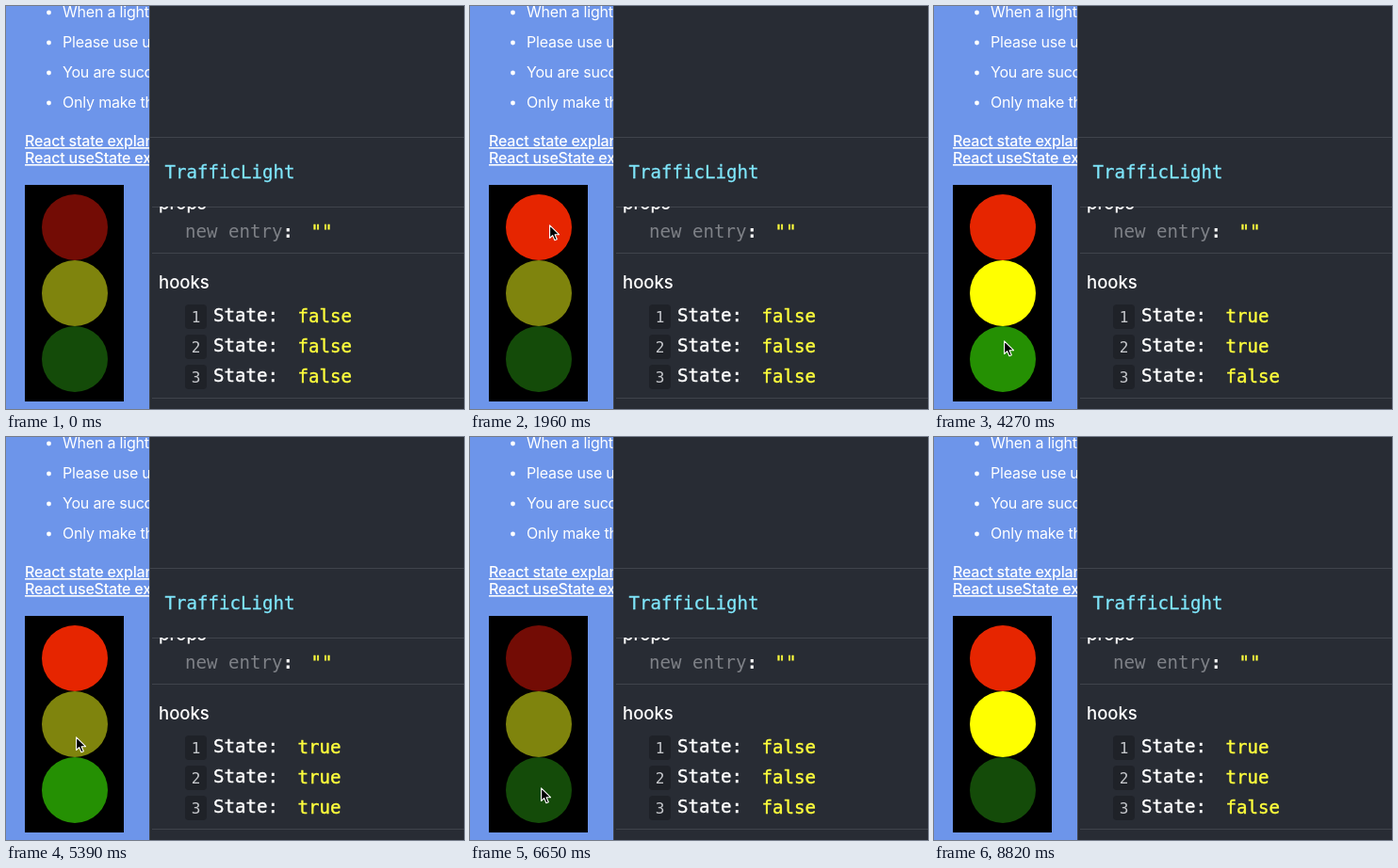
Write an HTML page that moves like this. It is 486 px wide and 428 px high and loops after 8.89 s.

```html
<!DOCTYPE html>
<html lang="en">
<head>
<meta charset="utf-8">
<title>Traffic light state</title>
<style>
html, body { margin: 0; width: 100%; height: 100%; overflow: hidden; background: #282c34; }
svg { display: block; }
.sans { font-family: Inter, "Open Sans", sans-serif; }
.mono { font-family: "DejaVu Sans Mono", monospace; font-size: 19.1px; }
.page { font-size: 16px; fill: #fff; letter-spacing: -.2px; }
.link { text-decoration: underline; font-weight: 500; }
.head { font-size: 18.5px; font-weight: 500; fill: #fff; }
.name { fill: #7fe6fb; stroke: #7fe6fb; stroke-width: .3px; }
.label { fill: #fff; stroke: #fff; stroke-width: .4px; }
.value { fill: #ffff3c; stroke: #ffff3c; stroke-width: .4px; }
.badge { font-size: 16px; fill: #c6c8cc; text-anchor: middle; }
</style>
</head>
<body>
<svg width="486" height="428" viewBox="0 0 486 428">
  <defs>
    <clipPath id="left"><rect width="152" height="428"/></clipPath>
    <clipPath id="scroll"><rect x="152" y="213" width="334" height="215"/></clipPath>
  </defs>
  <g clip-path="url(#left)" class="sans page">
    <rect width="152" height="428" fill="#6d95ea"/>
    <g id="list"></g>
    <text class="link" x="20" y="149">React state explanation</text>
    <text class="link" x="20" y="167">React useState explanation</text>
    <rect x="20" y="190" width="105" height="230" fill="#000"/>
    <g id="lamps"></g>
  </g>
  <rect x="152" width="334" height="428" fill="#282c34"/>
  <rect x="152" width="1" height="428" fill="#40444c"/>
  <path d="M153 139.5H486M155 213.5H486M155 262.5H486M155 416.5H486" stroke="#40444c"/>
  <text class="mono name" x="168.500" y="183">TrafficLight</text>
  <text class="sans head" x="162" y="216" clip-path="url(#scroll)">props</text>
  <text class="mono" x="190" y="246" fill="#7e8187">new entry<tspan fill="#fff" font-weight="bold">:</tspan></text>
  <text class="mono value" x="323.500" y="246">""</text>
  <text class="sans head" x="162" y="300">hooks</text>
  <g id="hooks"></g>
  <g id="cursor">
    <path d="M.6 .8V14.500L3.700 11.600L5.900 16.800L8.300 15.700L6.100 10.700H10.500Z"
      fill="#000" stroke="#fff" stroke-width="1.100" stroke-linejoin="round"/>
  </g>
</svg>
<script>
const LOOP = 8890, STEP = 70;
const $ = id => document.getElementById(id);

function add(parent, tag, attrs, text = '') {
  const el = document.createElementNS('http://www.w3.org/2000/svg', tag);
  for (const key in attrs) el.setAttribute(key, attrs[key]);
  el.textContent = text;
  return parent.appendChild(el);
}

['When a light is on', 'Please use useState', 'You are successful', 'Only make the light']
  .forEach((line, i) => {
    const y = 12 + i * 32;
    add($('list'), 'circle', { cx: 45.5, cy: y - 5, r: 2.4, fill: '#fff' });
    add($('list'), 'text', { x: 60, y }, line);
  });

// Times at which each lamp toggles, and when the inspector picks that up.
const lights = [
  { off: '#730c05', on: '#e62500', clicks: [1610, 5810, 7280], polls: [2380, 6580, 7560] },
  { off: '#7f840d', on: '#ffff00', clicks: [2800, 5390, 7840], polls: [3430, 5530, 8750] },
  { off: '#144b09', on: '#259003', clicks: [4200, 6440], polls: [4550, 6580] }
];

lights.forEach((light, i) => {
  const y = 335 + i * 32;
  light.lamp = add($('lamps'), 'circle', { cx: 73, cy: 235 + i * 70, r: 35 });
  add($('hooks'), 'rect', { x: 190, y: y - 18, width: 23, height: 26, rx: 4, fill: '#1f2228' });
  add($('hooks'), 'text', { class: 'mono badge', x: 201.5, y: y + 1 }, i + 1);
  add($('hooks'), 'text', { class: 'mono label', x: 220, y }, 'State:');
  light.value = add($('hooks'), 'text', { class: 'mono value', x: 309.5, y: y + 1 });
});

// Cursor stops: time, x, y
const path = [
  [280, 70, 436], [1050, 88, 225], [1470, 88, 225], [1960, 84, 232],
  [2310, 84, 232], [2800, 78, 293], [3640, 78, 293], [4200, 74, 355],
  [4480, 74, 355], [5040, 74, 318], [5460, 74, 318], [5810, 78, 236],
  [6090, 78, 236], [6440, 75, 372], [6930, 75, 372], [7280, 78, 238],
  [7560, 78, 238], [7840, 76, 300], [8050, 76, 300], [8330, 70, 436]
];

const ease = p => p * p * (3 - 2 * p);

function cursorAt(t) {
  const next = path.findIndex(stop => stop[0] > t);
  if (next < 1) return path[0].slice(1);
  const [t0, x0, y0] = path[next - 1], [t1, x1, y1] = path[next];
  const p = ease((t - t0) / (t1 - t0));
  return [x0 + (x1 - x0) * p, y0 + (y1 - y0) * p];
}

const isOn = (times, t) => times.filter(time => time <= t).length % 2 === 1;

function draw(now) {
  const t = Math.floor((now % LOOP) / STEP) * STEP;
  for (const { lamp, value, on, off, clicks, polls } of lights) {
    lamp.setAttribute('fill', isOn(clicks, t) ? on : off);
    value.textContent = isOn(polls, t);
  }
  $('cursor').setAttribute('transform', `translate(${cursorAt(t)})`);
}

const start = performance.now();
function tick() {
  draw(performance.now() - start);
  requestAnimationFrame(tick);
}
tick();
</script>
</body>
</html>
```
